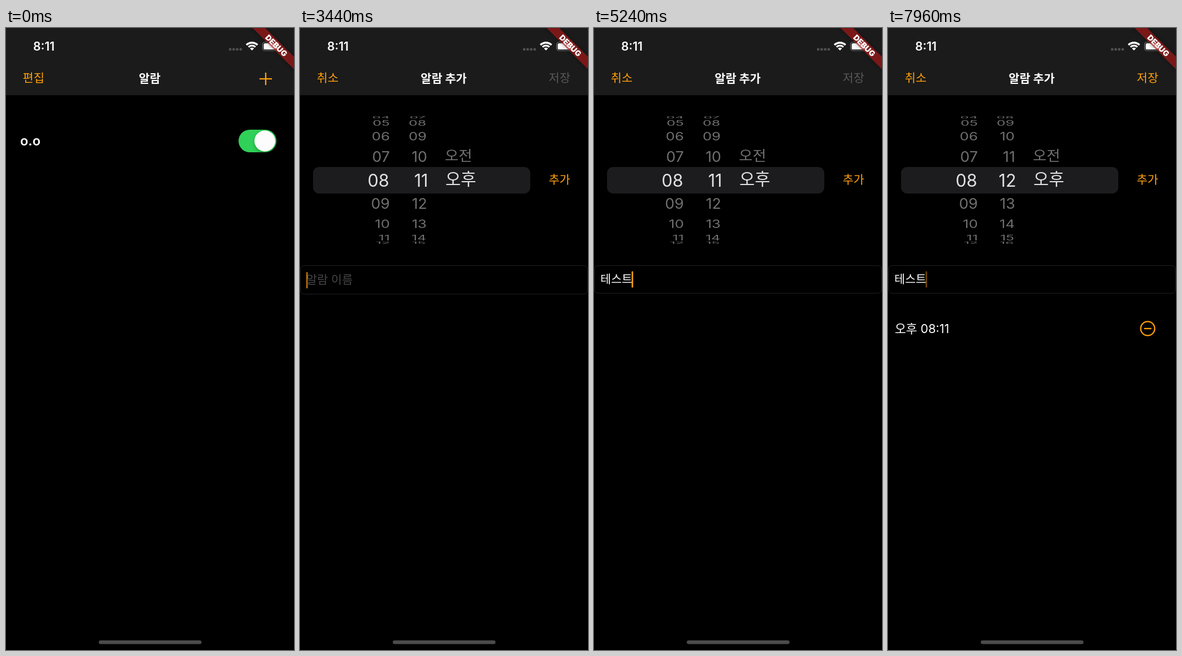
These frames come from a looping animation (509 px wide and 1101 px high, 8 s). An HTML page with a canvas:

```html
<!DOCTYPE html>
<html lang="ko">
<head>
<meta charset="utf-8">
<title>알람</title>
<style>
html, body { margin: 0; width: 100%; height: 100%; overflow: hidden; background: #000; }
canvas { display: block; width: 509px; height: 1101px; }
</style>
</head>
<body>
<canvas id="stage" width="509" height="1101"></canvas>
<script>
const ctx = document.getElementById('stage').getContext('2d');
const W = 509, H = 1101, LOOP = 8000, BAR = 119;
const FONT = 'Inter, "Noto Sans CJK KR", "Noto Sans CJK JP", "Noto Sans CJK", sans-serif';
const ORANGE = '#ff9f0a', WHITE = '#fff', GRAY = '#707070';
const LABEL = 20.8;
const ROW_TIME = 6240, TYPE_TIME = 4840;
const STROKES = ['ㅌ', '테', '텟', '테스', '테슽', '테스트'];

const clamp = (v, lo = 0, hi = 1) => Math.min(hi, Math.max(lo, v));
const span = (t, from, to) => clamp((t - from) / (to - from));
const smooth = p => p * p * (3 - 2 * p);
const fadeIn = (p, from) => span(p, from, 1) ** 1.4;

function cubic(x1, y1, x2, y2) {
  const at = (a, b, s) => 3 * (1 - s) ** 2 * s * a + 3 * (1 - s) * s * s * b + s ** 3;
  return x => {
    let lo = 0, hi = 1;
    for (let i = 0; i < 24; i++) {
      const mid = (lo + hi) / 2;
      if (at(x1, x2, mid) < x) lo = mid; else hi = mid;
    }
    return x <= 0 ? 0 : x >= 1 ? 1 : at(y1, y2, lo);
  };
}
const pageEase = cubic(0.35, 0.91, 0.33, 0.97);
const barEase = cubic(0.4, 0, 0.2, 1);

function withAlpha(alpha, draw) {
  if (alpha <= 0) return;
  ctx.save();
  ctx.globalAlpha *= alpha;
  draw();
  ctx.restore();
}

function clipped(x, y, w, h, draw) {
  ctx.save();
  ctx.beginPath();
  ctx.rect(x, y, w, h);
  ctx.clip();
  draw();
  ctx.restore();
}

// Text is placed by the vertical centre of its glyphs.
function text(str, x, cy, size, color, align = 'left', weight = 400) {
  ctx.font = `${weight} ${size}px ${FONT}`;
  ctx.textAlign = align;
  ctx.fillStyle = color;
  ctx.fillText(str, x, cy + size * 0.37);
}

function pill(x, y, w, h, r, color) {
  ctx.beginPath();
  ctx.roundRect(x, y, w, h, r);
  ctx.fillStyle = color;
  ctx.fill();
}

function disc(x, y, r, color) {
  ctx.beginPath();
  ctx.arc(x, y, r, 0, Math.PI * 2);
  ctx.fillStyle = color;
  ctx.fill();
}

function line(x1, y1, x2, y2, width) {
  ctx.beginPath();
  ctx.moveTo(x1, y1);
  ctx.lineTo(x2, y2);
  ctx.lineWidth = width;
  ctx.strokeStyle = ORANGE;
  ctx.stroke();
}

function statusBar() {
  text('8:11', 48, 32.5, 21, WHITE, 'left', 600);
  for (let i = 0; i < 4; i++) pill(394 + i * 6.2, 35.5, 4.4, 4.4, 1.5, '#505050');

  ctx.strokeStyle = WHITE;
  for (const [r, w] of [[2.5, 5], [8.6, 3.2], [13.8, 3.4]]) {
    ctx.beginPath();
    ctx.arc(434.7, 39.8, r, -Math.PI * 0.75, -Math.PI * 0.25);
    ctx.lineWidth = w;
    ctx.stroke();
  }

  ctx.beginPath();
  ctx.roundRect(453.5, 25, 29, 15, 4.2);
  ctx.lineWidth = 1.2;
  ctx.strokeStyle = '#777';
  ctx.stroke();
  pill(455.5, 27, 25, 11, 2.6, WHITE);
  pill(484.5, 30, 2, 5, 1, '#777');
}

function banner() {
  ctx.save();
  ctx.translate(W, 0);
  ctx.rotate(Math.PI / 4);
  ctx.shadowColor = 'rgba(0,0,0,.5)';
  ctx.shadowBlur = 7;
  ctx.fillStyle = 'rgba(183,28,28,.63)';
  ctx.fillRect(-60, 36, 120, 15.7);
  ctx.shadowBlur = 0;
  text('DEBUG', 0, 44, 13.8, WHITE, 'center', 900);
  ctx.restore();
}

function listBar(p, press) {
  withAlpha(1 - span(p, 0, 0.4), () => {
    text('편집', 29.5, 88.5, LABEL, ORANGE);
    text('알람', 254, 89, LABEL, WHITE, 'center', 700);
  });
  withAlpha((1 - span(p, 0, 0.6)) * press, () => {
    line(448, 90, 470, 90, 2.3);
    line(459, 79, 459, 101, 2.3);
  });
}

function addBar(p, canSave) {
  withAlpha(fadeIn(p, 0.6), () => text('취소', 29.8, 88.5, LABEL, ORANGE));
  withAlpha(fadeIn(p, 0.25), () =>
    text('알람 추가', 254 + (1 - p) * W / 2, 89, LABEL, WHITE, 'center', 700));
  withAlpha(fadeIn(p, 0.4), () =>
    text('저장', 439.6, 88.5, LABEL, canSave ? ORANGE : '#585858'));
}

function listBody() {
  text('o.o', 25, 199.5, 23.5, WHITE, 'left', 600);
  pill(411, 180, 67, 40, 20, '#30d158');
  ctx.save();
  ctx.shadowColor = 'rgba(0,0,0,.25)';
  ctx.shadowBlur = 6;
  ctx.shadowOffsetY = 3;
  disc(457.5, 200, 18.5, '#fcfcfc');
  ctx.restore();
}

// One item on the wheel, n rows away from the selected row.
function wheelItem(str, n, x, size, color, align) {
  const d = Math.abs(n);
  ctx.save();
  ctx.translate(x, 269.5 + 111 * Math.sin(clamp(n * 0.385, -1.57, 1.57)));
  ctx.scale(1, Math.max(0.05, Math.cos(n * 0.35)));
  text(str, 0, 0, size * (1 - 0.05 * d + 0.005 * d * d), color, align);
  ctx.restore();
}

function wheels(minute, size, color, magnified) {
  const column = (value, place) => {
    const base = Math.round(value);
    for (let i = base - 4; i <= base + 4; i++) {
      const n = i - value;
      wheelItem(String(i).padStart(2, '0'), n, place(Math.abs(n)), size, color, 'right');
    }
  };
  column(8, () => magnified ? 157.7 : 158.8);
  column(minute, d => magnified ? 226.5 : 224.7 - 0.8 * Math.max(0, d - 1));
  ['오전', '오후'].forEach((s, i) => {
    ctx.save();
    ctx.translate(0, -2);
    wheelItem(s, i - 1, magnified ? 257 : 256, magnified ? 29.5 : 27.5, color, 'left');
    ctx.restore();
  });
}

function picker(minute) {
  pill(23, 246, 384, 47, 11, '#1c1c1f');
  clipped(0, 155, W, 91, () => wheels(minute, 27.8, GRAY, false));
  clipped(0, 293, W, 90, () => wheels(minute, 27.8, GRAY, false));
  clipped(0, 246, W, 47, () => wheels(minute, 30.5, '#e1e1e2', true));
}

function cursorAlpha(t) {
  if (t < 2690) return 0;
  if (t < 2850) return span(t, 2690, 2800);
  if (t >= TYPE_TIME && t < 5790) return 1;
  const since = t - (t < TYPE_TIME ? 2850 : 5290);
  const fade = clamp((since % 500) / 300);
  if (since < 500) return 1;
  return Math.floor(since / 500) % 2 ? 1 - fade : fade * fade;
}

function field(t) {
  const typed = t < TYPE_TIME ? '' : STROKES[Math.min(5, Math.floor((t - TYPE_TIME) / 70))];
  ctx.beginPath();
  ctx.roundRect(0.5, 420.5, W - 1, typed ? 49 : 50.5, 7);
  ctx.lineWidth = 1;
  ctx.strokeStyle = '#202022';
  ctx.stroke();
  if (typed) text(typed, 11.3, 444.5, 20.5, WHITE);
  else text('알람 이름', 11, 445, LABEL, '#464648');
  const x = typed ? 66.5 - (3 - typed.length) * 19 : 11;
  withAlpha(cursorAlpha(t), () => pill(x, typed ? 430.5 : 432, 2.7, 29, 1.3, ORANGE));
}

function alarmRow() {
  text('오후 08:11', 12, 532, 21.5, WHITE);
  ctx.beginPath();
  ctx.arc(459, 532, 12.4, 0, Math.PI * 2);
  ctx.lineWidth = 2.3;
  ctx.strokeStyle = ORANGE;
  ctx.stroke();
  line(452.5, 532, 465.5, 532, 2.3);
}

function pressAlpha(t, down, up) {
  if (t < down) return 1;
  if (t < up) return 0.4;
  const p = span(t, up, up + 240);
  return 0.4 + 0.6 * (1 - (1 - p) ** 2);
}

function addBody(t) {
  picker(11 + smooth(span(t, 6700, 7450)));
  withAlpha(pressAlpha(t, 6130, ROW_TIME), () => text('추가', 439.4, 268, LABEL, ORANGE));
  field(t);
  if (t >= ROW_TIME) alarmRow();
}

function languageMenu(t) {
  withAlpha(span(t, 3890, 3930) * (1 - span(t, 4450, 4600)), () => {
    pill(159.5, 485.5, 191.5, 64.5, [11, 11, 0, 0], '#6b6b6b');
    pill(159.5, 550, 191.5, 65.5, [0, 0, 11, 11], '#0a84ff');
    text('English (US)', 255, 519, 22, WHITE, 'center');
    text('한국어', 255, 583.5, 22, WHITE, 'center');
  });
}

function render(t) {
  const linear = span(t, 1438, 1788);
  const slide = pageEase(linear), bar = barEase(linear);

  ctx.fillStyle = '#000';
  ctx.fillRect(0, 0, W, H);

  if (linear < 1) {
    ctx.save();
    ctx.translate(-slide * W / 3, 0);
    listBody();
    ctx.restore();
  }
  if (linear > 0) {
    ctx.save();
    ctx.translate((1 - slide) * W, 0);
    ctx.fillStyle = '#000';
    ctx.fillRect(0, BAR, W, H - BAR);
    addBody(t);
    ctx.restore();
  }

  ctx.fillStyle = '#1b1b1b';
  ctx.fillRect(0, 0, W, BAR);
  listBar(bar, pressAlpha(t, 1270, 1420));
  addBar(bar, t >= ROW_TIME);
  statusBar();
  banner();
  languageMenu(t);
  pill(164, 1084, 181.5, 6.5, 3.2, '#4b4b4b');
}

const start = performance.now();
function tick() {
  render((performance.now() - start) % LOOP);
  requestAnimationFrame(tick);
}
tick();
</script>
</body>
</html>
```
